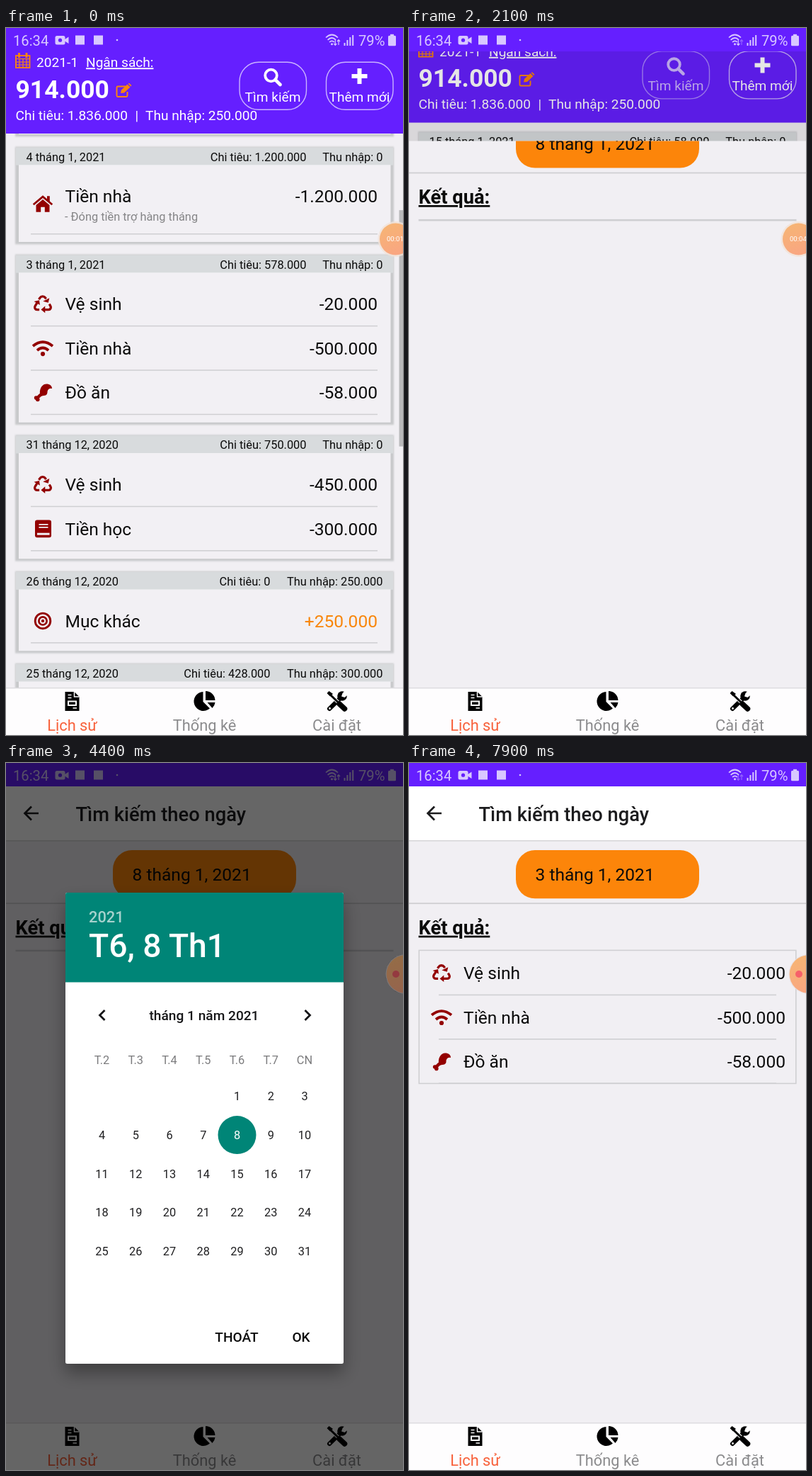
Write an HTML page that moves like this. It is 561x998 px and loops after 8 s.

```html
<!DOCTYPE html>
<html lang="vi">
<head>
<meta charset="utf-8">
<title>Sổ chi tiêu</title>
<style>
html, body { margin: 0; width: 100%; height: 100%; overflow: hidden; background: #f1eff3; }
svg { display: block; width: 100vw; height: 100vh; }
text { font-family: Roboto, "Noto Sans", sans-serif; white-space: pre; }
</style>
</head>
<body>
<svg id="stage" viewBox="0 0 561 998" xmlns="http://www.w3.org/2000/svg"></svg>
<script>
const LOOP = 8000, STEP = 100, SCROLL = 254, LIST_TOP = 149, TABS_TOP = 931, BAR = 33;
const PURPLE = '#651fff', ORANGE = '#fc850a', RED = '#930000', TEAL = '#008577';
const PAGE = '#f1eff3', LINE = '#cfcfd2', PALE = '#d8c8ff';
const SP = 1.365; // stage pixels per text unit

// ---- markup helpers ----
const text = (x, y, size, str, o = {}) =>
  `<text x="${x}" y="${y + size * SP * 0.355}" font-size="${size * SP}" fill="${o.fill || '#0b0b0b'}"` +
  ` text-anchor="${o.anchor || 'start'}" font-weight="${o.weight || 400}"` +
  `${o.id ? ` id="${o.id}"` : ''}${o.under ? ' text-decoration="underline"' : ''}>${str}</text>`;
const rect = (x, y, w, h, fill, extra = '') =>
  `<rect x="${x}" y="${y}" width="${w}" height="${h}" fill="${fill}" ${extra}/>`;
const path = (d, fill, extra = '') => `<path d="${d}" fill="${fill}" ${extra}/>`;
const stroke = (d, color, w, extra = '') =>
  `<path d="${d}" fill="none" stroke="${color}" stroke-width="${w}" ${extra}/>`;
const circle = (x, y, r, fill, extra = '') => `<circle cx="${x}" cy="${y}" r="${r}" fill="${fill}" ${extra}/>`;
const at = (x, y, body, extra = '') => `<g transform="translate(${x} ${y})" ${extra}>${body}</g>`;

// ---- category icons, centred on 0,0 ----
const icons = {
  recycle: '<g transform="scale(.051) translate(-256 -262)">' +
    stroke('M148 132L174 92C210 35 292 35 330 92L345 118M95 232L42 318C15 362 45 416 96 416H160' +
      'M437 262L470 318C497 362 467 416 416 416H310', RED, 64) +
    path('M262 184L408 226L438 96zM176 286L12 190L158 154zM320 318V506L206 416z', RED) + '</g>',
  wifi: stroke('M-14 -3.2Q0 -14.5 14 -3.2M-8 3Q0 -4 8 3', RED, 3.8) + circle(0, 8, 3.1, RED),
  home: stroke('M-13.3 1.6L0 -9.6L13.3 1.6', RED, 2.8) +
    path('M-9.5 2.4L0 -5.6L9.5 2.4V12H2.8V5H-2.8V12H-9.5zM6 -10.5H9.8V-2L6 -5z', RED),
  food: path('M-4 2C-5 -5 -1 -12 5 -12C10 -12 13 -9.5 13 -5.5Q8 -6.5 6.5 -1.5Q7 2.5 4 4Q-1 4.5 -4 6L-6 4z', RED) +
    stroke('M-3 3L-8 8', RED, 4.4) + circle(-9.4, 7.6, 2.8, RED) + circle(-7.2, 10, 2.8, RED),
  book: rect(-11, -12.3, 23, 24.6, RED, 'rx="3"') +
    stroke('M-5.5 -6H7.5M-5.5 -2H7.5', PAGE, 1.8) + stroke('M-8 7.3H9.5', PAGE, 3),
  target: circle(0, 0, 10.8, 'none', `stroke="${RED}" stroke-width="2.9"`) +
    circle(0, 0, 5.6, 'none', `stroke="${RED}" stroke-width="2.7"`) + circle(0, 0, 2.2, RED),
  prize: `<ellipse cx="0.5" cy="-1.5" rx="12.8" ry="10" fill="${RED}"/>` + path('M-10 2L-13 10Q-7 10 -2 7z', RED) +
    text(0.5, -1.5, 11, '$', { anchor: 'middle', weight: 700, fill: PAGE })
};

// ---- history list ----
const cards = [
  ['15 tháng 1, 2021', '58.000', '0', [['recycle', 'Vệ sinh', '-58.000']]],
  ['6 tháng 1, 2021', '0', '250.000', [['prize', 'Trúng thưởng', '+250.000']]],
  ['4 tháng 1, 2021', '1.200.000', '0', [['home', 'Tiền nhà', '-1.200.000', '- Đóng tiền trợ hàng tháng']]],
  ['3 tháng 1, 2021', '578.000', '0',
    [['recycle', 'Vệ sinh', '-20.000'], ['wifi', 'Tiền nhà', '-500.000'], ['food', 'Đồ ăn', '-58.000']]],
  ['31 tháng 12, 2020', '750.000', '0', [['recycle', 'Vệ sinh', '-450.000'], ['book', 'Tiền học', '-300.000']]],
  ['26 tháng 12, 2020', '0', '250.000', [['target', 'Mục khác', '+250.000']]],
  ['25 tháng 12, 2020', '428.000', '300.000', [['recycle', 'Vệ sinh', '-428.000']]]
];
const ROW = 62.4;

function row([icon, name, sum, note], y) {
  return at(52, y + (note ? 10 : 0), icons[icon]) + text(83.5, y, 18, name) +
    text(525, y, 18, sum, { anchor: 'end', fill: sum[0] === '+' ? '#f8860b' : '#0b0b0b' }) +
    (note ? text(83, y + 28, 12, note, { fill: '#858587' }) : '') +
    rect(35, y + (note ? 52.3 : 30.2), 490, 1.5, LINE);
}

function list() {
  let y = 175.7, out = '';
  for (const [date, spent, income, rows] of cards) {
    const h = ROW * rows.length + (rows[0][3] ? 22 : 0);
    out += rect(13, y - 14, 535, h + 53.2, '#c8c9cb', 'filter="url(#soft)"') +
      rect(14, y - 13, 533, 25, '#d8dbdd') + rect(18, y + 11.5, 525.5, h + 24.4, '#f2f0f4') +
      text(28.5, y, 12, date) + text(532.5, y, 12, 'Thu nhập: ' + income, { anchor: 'end' }) +
      text(income === '0' ? 424.5 : 373.5, y, 12, 'Chi tiêu: ' + spent, { anchor: 'end' }) +
      rows.map((r, i) => row(r, y + 56 + i * ROW)).join('');
    y += h + 67.6;
  }
  return out;
}

function historyScreen() {
  const white = { fill: '#fff' }, mid = { fill: '#fff', anchor: 'middle' };
  const outline = x => rect(x, 48.3, 94.5, 67, 'none', 'rx="27" stroke="#c9b2ff" stroke-width="1.4"');
  const calendar = rect(14, 39, 19.5, 17, 'none', `stroke="${ORANGE}" stroke-width="1.8"`) +
    stroke('M14 43.5H33M14 48H33M14 52H33M19 44V56M24 44V56M29 44V56', ORANGE, 1.2) +
    stroke('M18.5 35V42M29 35V42', ORANGE, 2.8);
  const edit = stroke('M169 82.5H158Q156.5 82.5 156.5 84V95.5Q156.5 97 158 97H170Q171.5 97 171.5 95.5V90', ORANGE, 1.9) +
    path('M162 92L163 87.5L171.5 79.5L175.5 83.5L167 91.5zM172.6 78.6L174 77.7L177.4 81L176.4 82.4z', ORANGE);
  return rect(0, 0, 561, 998, PAGE) +
    `<g clip-path="url(#listClip)"><g id="list">${list()}</g>` +
    rect(555.5, LIST_TOP, 5.5, 333.5, '#b9b9bb', 'id="thumb"') + '</g>' +
    rect(0, 0, 561, LIST_TOP, PURPLE) + calendar +
    text(43, 48.5, 14, '2021-1', white) + text(113, 48.5, 14, 'Ngân sách:', { fill: '#fff', under: true }) +
    text(13.5, 86, 26, '914.000', { fill: '#fff', weight: 700 }) + edit +
    text(13.5, 123, 14, 'Chi tiêu: 1.836.000', white) + text(182.5, 123, 14, '|', white) +
    text(197, 123, 14, 'Thu nhập: 250.000', white) +
    `<g id="find">${outline(330)}${circle(374.5, 67, 8.3, 'none', 'stroke="#fff" stroke-width="3.8"')}` +
    `${stroke('M380.5 73L387.5 80', '#fff', 4.6, 'stroke-linecap="round"')}${text(377, 97, 14, 'Tìm kiếm', mid)}</g>` +
    outline(452.5) + stroke('M488.5 68H510.5M499.5 57V79', '#fff', 6) + text(499.5, 97, 14, 'Thêm mới', mid) +
    rect(0, 0, 561, 998, '#000', 'id="shade"');
}

function searchScreen() {
  const rows = cards[3][3].map(([icon, name, sum], i) => {
    const y = 296.6 + i * ROW;
    return at(46, y, icons[icon]) + text(77, y, 18, name) + text(532, y, 18, sum, { anchor: 'end' }) +
      rect(42, y + 30, 477, 1.6, LINE);
  }).join('');
  return rect(0, 0, 561, 998, PAGE) +
    rect(0, BAR, 561, 77.5, '#d6d5d8') + rect(0, BAR, 561, 76, '#fff') +
    stroke('M46 71H27M36 61.5L26.5 71L36 80.5', '#1c1c1e', 2.7) +
    text(98.5, 72, 20, 'Tìm kiếm theo ngày', { weight: 500, fill: '#1c1c1e' }) +
    `<g id="pick">${rect(151, 123, 259, 68.3, ORANGE, 'rx="27"')}${text(178.5, 157, 18, '', { id: 'day' })}</g>` +
    rect(0, 197.3, 561, 1.8, LINE) + text(13.5, 232, 20, 'Kết quả:', { weight: 700, under: true }) +
    rect(13.5, 263.6, 534, 2.6, LINE, 'id="empty"') +
    `<g id="found">${rect(14.2, 264.4, 532.6, 188, 'none', `stroke="${LINE}" stroke-width="1.6"`)}${rows}</g>`;
}

function tabs() {
  const bill = path('M-10 -13H3L10 -6V14H-10z', '#000') + stroke('M3 -13V-6H10', '#fff', 1.5) +
    stroke('M-6 -8.5H-1M-6 -4.5H-1M1 10H6.5', '#fff', 1.7) + rect(-5.5, 0.5, 11, 5.5, 'none', 'stroke="#fff" stroke-width="2"');
  const pie = path('M-2 -13V1L7.5 10.5A13.5 13.5 0 1 1 -2 -13zM1.5 -14A13.5 13.5 0 0 1 15 -1H1.5zM4 2H15A13 13 0 0 1 11 10z', '#000');
  const tools = stroke('M10 -9L-10.5 11', '#000', 6, 'stroke-linecap="round"') + circle(7.5, -7, 6.8, '#000') +
    path('M6.5 -6.5L8 -11L13 -16L16 -9L11 -5z', '#fff') + circle(-10, 10.5, 1.4, '#fff') +
    stroke('M-9 -9L3 3', '#fff', 5) + stroke('M-11 -10.5L3 3', '#000', 3) + path('M-14 -11L-11 -14L-5.5 -10L-9.5 -6.5z', '#000') +
    stroke('M3.5 4L11 11', '#000', 7.5, 'stroke-linecap="round"');
  const tab = (x, icon, name, fill) => at(x, 950, icon) + text(x, 984.5, 16, name, { anchor: 'middle', fill });
  return rect(0, TABS_TOP, 561, 67, '#dcdbde') + rect(0, TABS_TOP + 1.4, 561, 66, '#fefdfe') +
    tab(93.5, bill, 'Lịch sử', '#f8623c') + tab(280.5, pie, 'Thống kê', '#8b8b8d') + tab(467.5, tools, 'Cài đặt', '#8b8b8d');
}

function statusBar() {
  const bars = [4, 8, 12, 15].map((h, i) => rect(477.5 + i * 3.9, 25 - h, 2, h, PALE)).join('');
  return rect(0, 0, 561, BAR, PURPLE) + text(10, 18, 14.8, '16:34', { fill: PALE }) +
    rect(69.5, 11, 14, 12.5, PALE, 'rx="2.5"') + path('M83 16L88.5 12.5V22L83 18.5z', PALE) + circle(76.5, 17.2, 2.6, PURPLE) +
    rect(98, 10.5, 13, 13, PALE) + rect(124, 10.5, 13, 13, PALE) + circle(157, 17, 1.3, PALE) +
    stroke('M452 13.5Q460.5 5.5 469 13.5M454.6 16.8Q460.5 11.2 466 16.8M457 20Q460.5 16.6 464 20', PALE, 1.7) +
    circle(460.5, 22.8, 1.5, PALE) +
    stroke('M465.3 17V24M463.3 22L465.3 24.3L467.3 22', PALE, 1.2, 'id="down"') +
    stroke('M470 24V17M468 19L470 16.7L472 19', PALE, 1.2, 'id="up"') + bars +
    text(498, 18, 14.8, '79%', { fill: PALE }) + rect(543, 8.8, 5, 3, PALE) + rect(540, 10.8, 11, 14.5, PALE, 'rx="1.5"');
}

function dialog() {
  const colX = i => 135.5 + 47.75 * i, rowY = i => 470.6 + 54.55 * i;
  const mid = (fill, weight) => ({ anchor: 'middle', fill, weight });
  const week = ['T.2', 'T.3', 'T.4', 'T.5', 'T.6', 'T.7', 'CN']
    .map((d, i) => text(colX(i), 418.7, 12, d, mid('#7b7b7d'))).join('');
  let days = '';
  for (let d = 1; d <= 31; d++) {
    const cell = d + 3;
    days += text(colX(cell % 7), rowY(Math.floor(cell / 7)), 12, d, { ...mid('#1f1f21'), id: 'd' + d });
  }
  return rect(84, 183, 393, 665, '#fff', 'rx="2.7" filter="url(#drop)"') +
    path('M84 309.5V185.7Q84 183 86.7 183H474.3Q477 183 477 185.7V309.5z', TEAL) +
    text(117, 217.5, 16, '2021', { fill: '#a6d2cd', weight: 500 }) +
    text(117, 257.5, 34, '', { fill: '#fff', weight: 500, id: 'chosen' }) +
    stroke('M139.5 349L132.5 356L139.5 363M422.5 349L429.5 356L422.5 363', '#161618', 2.8) +
    text(280, 356, 14, 'tháng 1 năm 2021', mid('#161618', 500)) + week +
    circle(0, 0, 27, TEAL, 'id="dot"') + days +
    text(326, 810, 14, 'THOÁT', mid('#0b0b0b', 500)) + text(417, 810, 14, 'OK', mid('#0b0b0b', 500));
}

function recorder() {
  return `<g id="clock">${circle(550.5, 298, 25, '#f3e3d8', 'opacity=".8"')}${circle(550.5, 298, 22.5, 'url(#peach)')}` +
    `${text(538, 298, 7, '', { fill: '#fff', id: 'secs' })}</g>` +
    `<g id="dock">${circle(564.5, 298, 28, '#e9dfe0', 'opacity=".8"')}${circle(564.5, 298, 26.8, 'url(#peach)')}` +
    `${circle(551, 298, 5, '#f6606a')}${circle(564.5, 298, 28.2, '#000', 'id="dockDim"')}</g>`;
}

document.getElementById('stage').innerHTML = `<defs>
  <clipPath id="listClip">${rect(0, LIST_TOP, 561, TABS_TOP - LIST_TOP, '#000')}</clipPath>
  <clipPath id="reveal">${rect(0, 0, 561, 998, '#000', 'id="window"')}</clipPath>
  <linearGradient id="peach" x1="0" y1="0" x2=".4" y2="1"><stop stop-color="#f6b673"/><stop offset="1" stop-color="#f9a681"/></linearGradient>
  <filter id="soft" x="-5%" y="-10%" width="110%" height="120%"><feGaussianBlur stdDeviation="1.2"/></filter>
  <filter id="drop" x="-20%" y="-20%" width="140%" height="140%"><feDropShadow dx="0" dy="13" stdDeviation="12" flood-opacity=".35"/></filter>
</defs>
<g id="history">${historyScreen()}</g>
<g clip-path="url(#reveal)"><g id="search">${searchScreen()}</g></g>
${tabs()}${statusBar()}${rect(0, 0, 561, 998, '#000', 'id="dim"')}${recorder()}<g id="dialog">${dialog()}</g>`;

// ---- motion ----
const el = {};
document.querySelectorAll('[id]').forEach(n => { el[n.id] = n; });
const set = (id, name, value) => el[id].setAttribute(name, value);
const fade = (id, value) => set(id, 'opacity', value);
const shift = (id, y) => set(id, 'transform', `translate(0 ${y})`);
const clamp = v => Math.min(1, Math.max(0, v));
// value of the last [time, value] pair already reached
const hold = (t, ...keys) => keys.reduce((v, [k, x]) => (t >= k ? x : v), keys[0][1]);

// cubic-bezier(.35, .45, 0, 1)
function reveal(x) {
  let lo = 0, hi = 1;
  for (let i = 0; i < 24; i++) {
    const s = (lo + hi) / 2;
    if (1.05 * s * (1 - s) ** 2 + s ** 3 < x) lo = s; else hi = s;
  }
  return 1.35 * lo * (1 - lo) ** 2 + 3 * lo * lo * (1 - lo) + lo ** 3;
}

function draw(t) {
  const scroll = SCROLL * (1 - clamp(t / 900)) ** 1.25;
  shift('list', -scroll);
  shift('thumb', scroll * 0.4258);
  fade('thumb', hold(t, [0, 1], [1400, 0.65], [1500, 0.3], [1600, 0]));
  fade('find', hold(t, [0, 1], [1400, 0.9], [1500, 0.78], [1600, 0.68]));

  const p = t >= 2300 ? 1 : reveal(clamp((t - 1980) / 303));
  const H = TABS_TOP - BAR, gap = (1 - p) * H;
  shift('history', -0.02 * H * p);
  fade('shade', 0.1 * clamp(p / 0.36));
  set('window', 'y', BAR + gap);
  shift('search', gap * 0.05);

  const done = t >= 6400;
  fade('pick', hold(t, [0, 1], [3400, 0.75], [3500, 0.55], [3900, 1]));
  el.day.textContent = (done ? 3 : 8) + ' tháng 1, 2021';
  fade('empty', done ? 0 : 1);
  fade('found', done ? 1 : 0);

  const open = hold(t, [0, 0], [4200, 0.5], [4400, 1], [6200, 0.4], [6300, 0]);
  fade('dialog', open);
  fade('dim', open * 0.6);
  fade('dockDim', open * 0.4);
  const third = t >= 5400;
  el.chosen.textContent = third ? 'CN, 3 Th1' : 'T6, 8 Th1';
  set('dot', 'cx', third ? 422 : 326.5);
  set('dot', 'cy', third ? 470.6 : 525.1);
  set('d3', 'fill', third ? '#fff' : '#1f1f21');
  set('d8', 'fill', third ? TEAL : '#fff');

  el.secs.textContent = '00:0' + Math.min(4, 1 + Math.floor(t / 700));
  fade('clock', t < 2800 ? 1 : 0);
  fade('dock', t < 2800 ? 0 : 1);
  fade('down', hold(t, [0, 1], [5900, 0.4], [6900, 1], [7900, 0.4]));
  fade('up', hold(t, [0, 1], [1800, 0.4], [2800, 1], [5900, 0.4]));
}

const start = performance.now();
function tick() {
  const t = (performance.now() - start) % LOOP;
  draw(Math.floor(t / STEP) * STEP);
  requestAnimationFrame(tick);
}
tick();
</script>
</body>
</html>
```
